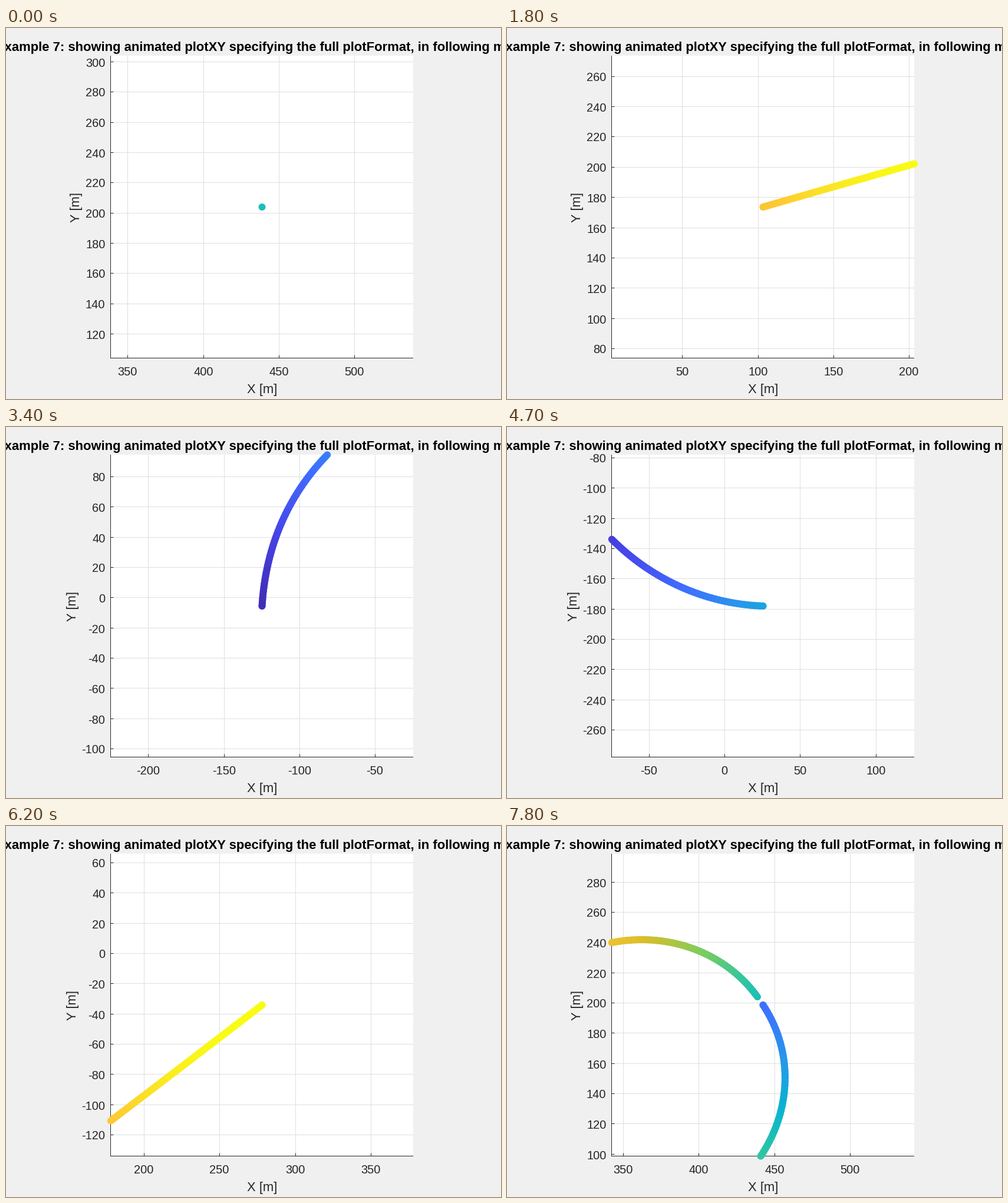
Write a matplotlib script that moves like this. It is 840 px wide and 630 px high and loops after 7.85 s.

```python
import numpy as np
import matplotlib.pyplot as plt
from matplotlib.animation import FuncAnimation
from matplotlib.collections import LineCollection
from matplotlib.colors import LinearSegmentedColormap
from matplotlib.patches import Circle, Rectangle

W, H, DPI = 840, 630, 100
PT = 72 / DPI
FRAMES, INTERVAL = 157, 50
SUB = 4                     # path pieces per frame
SPEED = 9.88                # metres per frame
PERIOD = 98                 # frames per colour cycle
SPAN, SCALE = 100, 2.567    # half view in metres, pixels per metre
CX, CY = 434.5, 304
LEFT, RIGHT, TOP, BOTTOM = 177.5, 691, 47, 560.5
DARK = "#262626"

PARULA = LinearSegmentedColormap.from_list("parula", [
    "#3e26a8", "#4747eb", "#3e6fff", "#2797eb", "#08b5d0",
    "#31c69f", "#81cc59", "#dcbd29", "#fec934", "#f9fb15"])

# Ends of the bends and straights: frame, x, y, heading in degrees
ROAD = np.array([
    (0, 438.7, 204, 126), (11, 342.4, 239.9, 191), (18, 275.2, 222.8, 196),
    (47, -1.5, 143.1, 196.5), (57, -84.9, 91.2, 227.5), (68, -124.9, -5.5, 266.5),
    (83, -72.5, -136, 316), (94, 25.3, -178, 358), (98, 64.5, -175.2, 370),
    (107, 142.8, -137.4, 397.2), (139, 396.6, 57.6, 397.8),
    (145, 440.1, 97.5, 415.5), (156, 442.4, 198.6, 483.5)])


def road(t):
    """Position at time t: Hermite pieces shaped like arcs between knots."""
    i = np.clip(np.searchsorted(ROAD[:, 0], t, side="right") - 1, 0, len(ROAD) - 2)
    (f0, x0, y0, h0), (f1, x1, y1, h1) = ROAD[i].T, ROAD[i + 1].T
    h0, h1 = np.radians(h0), np.radians(h1)
    u = (t - f0) / (f1 - f0)
    quarter = (h1 - h0) / 4
    pull = SPEED * (f1 - f0) * np.tan(quarter) / quarter

    def blend(a, b, da, db):
        return (a + (b - a) * u * u * (3 - 2 * u)
                + pull * u * (1 - u) * ((1 - u) * da - u * db))

    return np.column_stack([blend(x0, x1, np.cos(h0), np.cos(h1)),
                            blend(y0, y1, np.sin(h0), np.sin(h1))])


def shade(t):
    return PARULA(0.5 + 0.5 * np.sin(2 * np.pi * t / PERIOD))


def clip(a, b):
    """Clip segments a-b to the square view; returns ends and a keep mask."""
    d = b - a
    d = np.where(np.abs(d) < 1e-9, 1e-9, d)
    t1, t2 = (-SPAN - a) / d, (SPAN - a) / d
    lo = np.clip(np.minimum(t1, t2).max(axis=1), 0, 1)[:, None]
    hi = np.clip(np.maximum(t1, t2).min(axis=1), 0, 1)[:, None]
    return a + lo * d, a + hi * d, (hi > lo)[:, 0]


def to_px(rel):
    return np.array([CX, CY]) + rel * np.array([SCALE, -SCALE])


times = np.arange((FRAMES - 1) * SUB + 1) / SUB
path = road(times)
colors = shade(times[:-1] + 0.5 / SUB)

plt.rcParams["font.family"] = "Liberation Sans"
fig = plt.figure(figsize=(W / DPI, H / DPI), dpi=DPI, facecolor="#f0f0f0")
ax = fig.add_axes([0, 0, 1, 1])
ax.set_xlim(0, W)
ax.set_ylim(H, 0)
ax.axis("off")


def label(x, y, s, size, **kw):
    opts = dict(ha="center", va="baseline", color=DARK, zorder=3)
    return ax.text(x, y, s, fontsize=size * PT, **{**opts, **kw})


def rule(xs, ys, color, z):
    return ax.plot(xs, ys, color=color, lw=PT, zorder=z, snap=False,
                   solid_capstyle="butt")[0]


ax.add_patch(Rectangle((177, TOP), RIGHT - 177, 514, fc="white", ec="none", zorder=0))
rule([LEFT, LEFT], [TOP, BOTTOM + 0.5], DARK, 2)
rule([LEFT - 0.5, RIGHT], [BOTTOM, BOTTOM], DARK, 2)
label(CX, 39, "Example 7: showing animated plotXY specifying the full plotFormat, "
      "in following mode", 22, weight="bold", color="black")
label(CX, 620, "X [m]", 22)
y_name = label(125.5, CY, "Y [m]", 22, rotation=90, rotation_mode="anchor")


def tick_pool(n, ha):
    return [(rule([], [], "#dfdfdf", 1), rule([], [], DARK, 2),
             label(0, 0, "", 20, ha=ha)) for _ in range(n)]


x_ticks = tick_pool(5, "center")
y_ticks = tick_pool(11, "right")
trail = LineCollection([], linewidths=12 * PT, capstyle="round", zorder=4, snap=False)
ax.add_collection(trail)
dot = ax.add_patch(Circle((CX, CY), 6, ec="none", zorder=5))


def tick_values(mid, step):
    first = int(np.ceil((mid - SPAN) / step))
    last = int(np.floor((mid + SPAN) / step))
    return [k * step for k in range(first, last + 1)]


def place(pool, values, put):
    for i, parts in enumerate(pool):
        shown = i < len(values)
        for p in parts:
            p.set_visible(shown)
        if shown:
            parts[2].set_text(str(values[i]))
            put(values[i], *parts)


def draw(frame):
    n = frame * SUB
    head = path[n]

    def put_x(v, grid, tick, text):
        x = np.floor(CX + (v - head[0]) * SCALE) + 0.5
        grid.set_data([x, x], [TOP, BOTTOM])
        tick.set_data([x, x], [BOTTOM - 5, BOTTOM])
        text.set_position((x - 0.5, 590))

    def put_y(v, grid, tick, text):
        y = np.floor(CY - (v - head[1]) * SCALE) + 0.5
        grid.set_data([LEFT, RIGHT], [y, y])
        tick.set_data([LEFT, LEFT + 5], [y, y])
        text.set_position((168.5, y + 8))

    rows = tick_values(head[1], 20)
    place(x_ticks, tick_values(head[0], 50), put_x)
    place(y_ticks, rows, put_y)
    y_name.set_x(118.5 if rows[0] <= -100 else 125.5)

    a, b, keep = clip(path[:n] - head, path[1:n + 1] - head)
    trail.set_segments(np.stack([to_px(a[keep]), to_px(b[keep])], axis=1))
    trail.set_color(colors[:n][keep])
    dot.set_facecolor(shade(frame))
    return []


anim = FuncAnimation(fig, draw, frames=FRAMES, interval=INTERVAL,
                     repeat=True, repeat_delay=0, blit=False)
plt.show()
```
